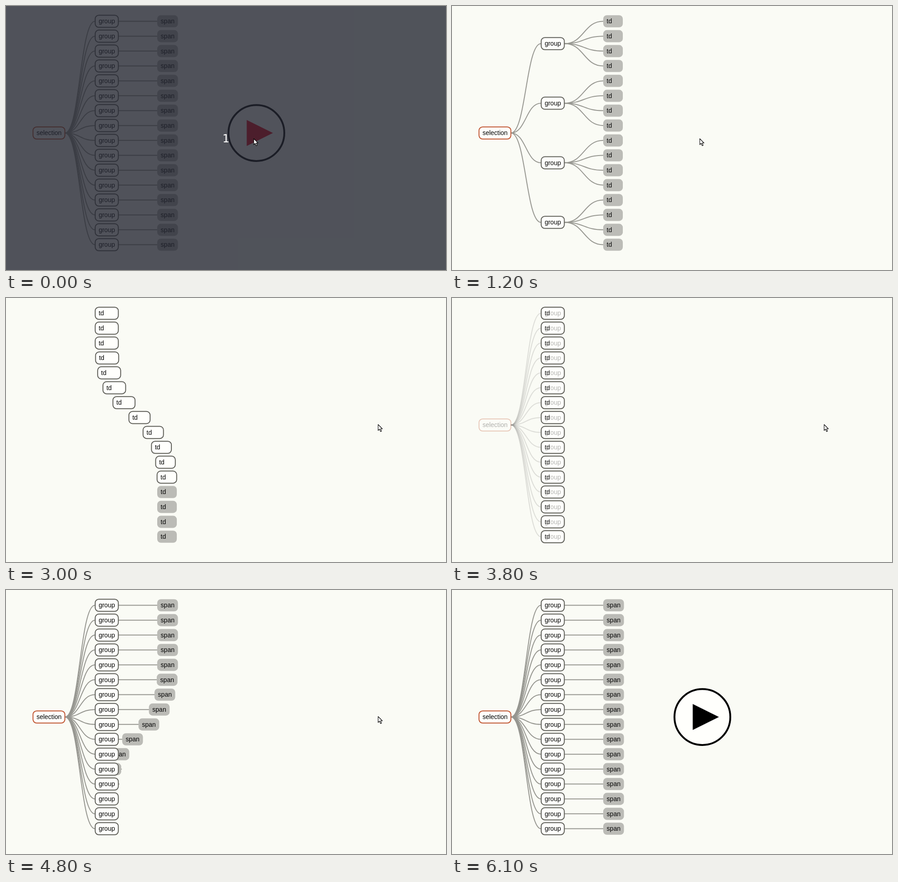
Recreate the animation shown at these times as an HTML page. Size 966 by 579 pixels, loop 6300 ms.

```html
<!DOCTYPE html>
<html lang="en">
<head>
<meta charset="utf-8">
<title>Flattening a grouped selection</title>
<style>
  html, body { margin: 0; width: 100%; height: 100%; overflow: hidden; background: #fafbf5; }
  svg { display: block; width: 966px; height: 579px; }
  text { font: 14px "Liberation Sans", Arial, sans-serif; }
  rect { fill: #fffffc; stroke: #5f5f59; stroke-width: 2; }
  .leaf rect { fill: #bbbbb6; stroke: none; }
  .root rect { stroke: #c0532f; }
  .link { fill: none; stroke: #969690; stroke-width: 2; }
  .fade > * { opacity: var(--alpha, 1); }
  #play circle { fill: #fffffc; stroke: #000; stroke-width: 4; }
  #shade { fill: #232631; fill-opacity: .79; stroke: none; }
  #count { font: 24px "DejaVu Sans", sans-serif; fill: #fff; }
  #arrow, #hand { fill: #fff; stroke: #000; stroke-width: 1.1; stroke-linejoin: round; }
</style>
</head>
<body>
<svg viewBox="0 0 966 579">
  <g id="nested" class="fade"></g>
  <g id="cells" class="fade"></g>
  <g id="spans"></g>
  <g id="flat" class="fade"></g>
  <g id="play">
    <circle cx="549.7" cy="278.6" r="61.3"/>
    <path id="triangle" d="M528.5 250L586 278.5L528.5 307Z"/>
  </g>
  <rect id="shade" width="966" height="579"/>
  <text id="count" x="475.2" y="298.5">1</text>
  <path id="arrow" d="M0 0V13L3 10.2L5.3 15.5L7.5 14.5L5.2 9.5H9.3Z"/>
  <path id="hand" d="M541.6 290.6q1.2-1.4 2.4 0v3.6l6 1.1q1.6.5 1.6 2v2.2l-1.2 3.3h-7l-3.2-4.4q-.2-1.6 1.4-1.2Z"/>
</svg>
<script>
const LOOP = 6300, STEP = 100, ROWS = 16;
const ROOT_X = 59.3, GROUP_X = 195.8, LEAF_X = 332;
const ROOT_W = 70, GROUP_W = 50.8, SPAN_W = 45.5, CELL_W = 43;
const ROOT_END = 129.5, GROUP_END = 247, MIDDLE = 278.5;
const CLICK = 600, PLAY_AGAIN = 6100;
const FADE = 750, MOVE = 400, STAGGER = 40;

const $ = id => document.getElementById(id);
const rowY = i => 33.5 + i * 98 / 3;
const clamp = p => Math.min(1, Math.max(0, p));
const lerp = (a, b, e) => a + (b - a) * e;
const cubic = p => (p = clamp(p)) < .5 ? 4 * p ** 3 : 1 - 4 * (1 - p) ** 3;
const fade = (t, start) => cubic((t - start) / FADE);
const staggered = (t, start, i) => cubic((t - start - i * STAGGER) / MOVE);

function add(parent, tag, attrs) {
  const el = document.createElementNS("http://www.w3.org/2000/svg", tag);
  for (const key in attrs) el.setAttribute(key, attrs[key]);
  return parent.appendChild(el);
}

function node(parent, kind, label, x, y, width) {
  const g = add(parent, "g", { class: kind, transform: `translate(${x} ${y})` });
  add(g, "rect", { y: -13.3, width, height: 26.6, rx: 8 });
  add(g, "text", { x: 7.6, y: 4.9 }).textContent = label;
  return g;
}

const curve = (x0, y0, x1, y1) => {
  const mid = (x0 + x1) / 2;
  return `M${x0} ${y0}C${mid} ${y0} ${mid} ${y1} ${x1} ${y1}`;
};
const link = (parent, ...ends) => add(parent, "path", { class: "link", d: curve(...ends) });

function tree(parent, groupYs) {
  groupYs.forEach(y => link(parent, ROOT_END, MIDDLE, GROUP_X - .5, y));
  node(parent, "root", "selection", ROOT_X, MIDDLE, ROOT_W);
  groupYs.forEach(y => node(parent, "group", "group", GROUP_X, y, GROUP_W));
}

const rows = Array.from({ length: ROWS }, (_, i) => rowY(i));
const parentY = i => rowY(Math.floor(i / 4) * 4 + 1.5);

rows.forEach((y, i) => link($("nested"), GROUP_END, parentY(i), LEAF_X, y));
tree($("nested"), [0, 4, 8, 12].map(parentY));
tree($("flat"), rows);
const cells = rows.map(y => node($("cells"), "leaf", "td", LEAF_X, y, CELL_W));
const spanLinks = rows.map(y => link($("spans"), GROUP_END, y, LEAF_X, y));
const spans = rows.map(y => node($("spans"), "leaf", "span", LEAF_X, y, SPAN_W));

const show = (id, on) => $(id).style.display = on ? "" : "none";
function setAlpha(id, alpha) {
  show(id, alpha > 0);
  $(id).style.setProperty("--alpha", alpha);
}

function drawCells(t) {
  cells.forEach((cell, i) => {
    const e = staggered(t, 2526, i);
    cell.setAttribute("class", e > 0 ? "cell" : "leaf");
    cell.setAttribute("transform", `translate(${lerp(LEAF_X, GROUP_X, e)} ${rows[i]})`);
    cell.firstChild.setAttribute("width", lerp(CELL_W, GROUP_W, e));
  });
}

function drawSpans(t) {
  spans.forEach((span, i) => {
    const e = t < CLICK ? 1 : staggered(t, 4249, i);
    span.setAttribute("transform", `translate(${lerp(GROUP_X, LEAF_X, e)} ${rows[i]})`);
    spanLinks[i].setAttribute("d", curve(GROUP_END, rows[i], lerp(GROUP_END, LEAF_X, e), rows[i]));
  });
}

function drawPointer(t) {
  const across = 1 - (1 - clamp((t - 1750) / 600)) ** 3;
  const leave = clamp((t - 5200) / 300) ** 2;
  const x = lerp(544, 817, across) - 17 * leave;
  const y = lerp(291, 277.5, across) - 174 * leave;
  const hand = t >= 500 && t < 1200;
  $("arrow").setAttribute("transform", `translate(${x} ${y})`);
  show("hand", hand);
  show("arrow", !hand && t < 5600);
}

function draw(t) {
  const before = t < CLICK, dark = t < 500;
  const appear = before ? 0 : fade(t, 580);
  setAlpha("nested", appear * (1 - fade(t, 1787)));
  setAlpha("cells", t < 4300 ? appear : 0);
  setAlpha("flat", before ? 1 : fade(t, 3487));
  show("spans", before || t > 4249);
  show("play", before || t >= PLAY_AGAIN);
  $("triangle").setAttribute("fill", before ? "#e8041c" : "#000");
  show("shade", dark);
  show("count", dark);
  drawCells(t);
  drawSpans(t);
  drawPointer(t);
}

// The picture advances ten times a second.
const origin = performance.now();
function tick() {
  const t = (performance.now() - origin) % LOOP;
  draw(Math.floor(t / STEP) * STEP);
  requestAnimationFrame(tick);
}
tick();
</script>
</body>
</html>
```
